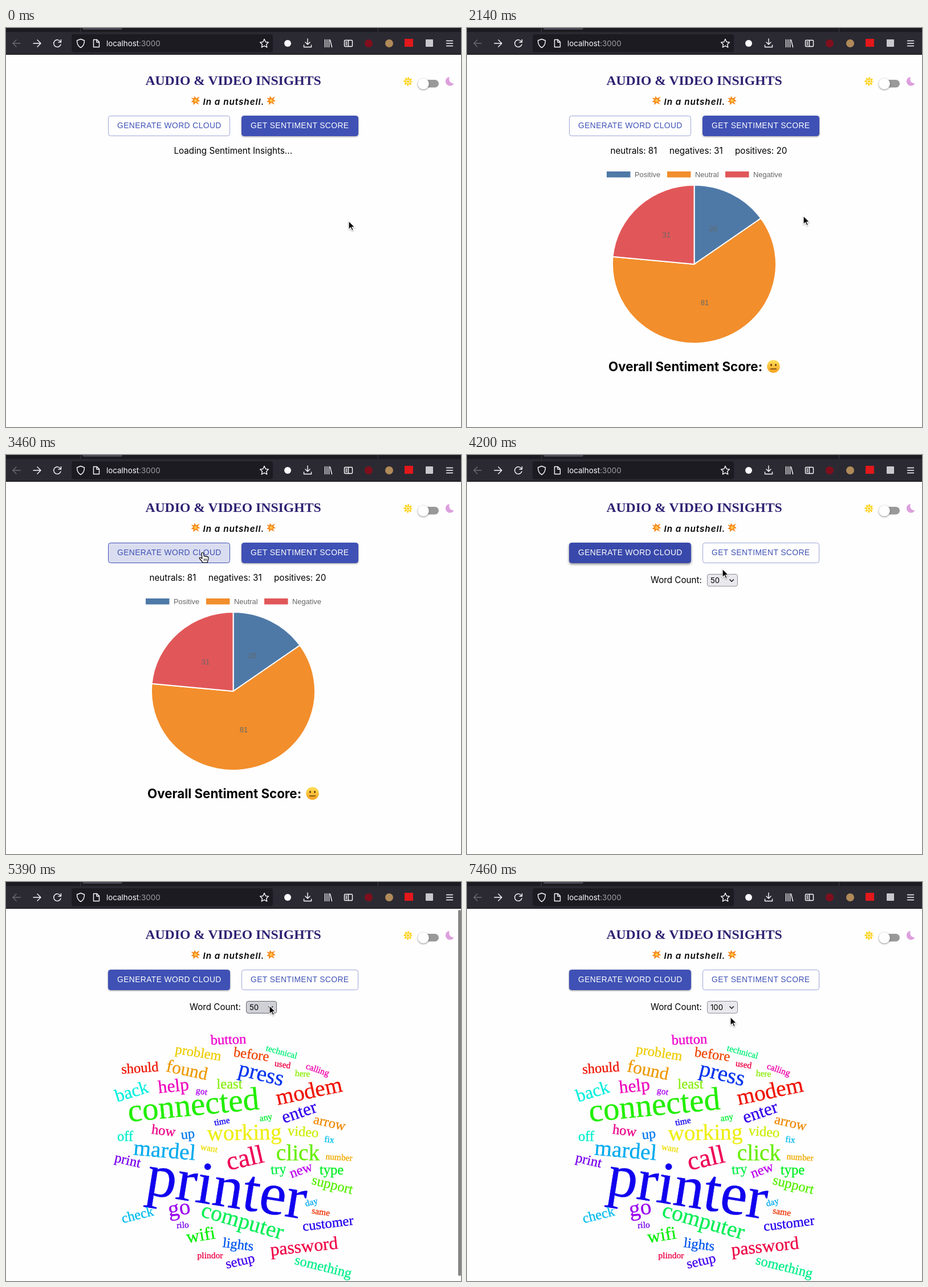
An HTML page that plays this animation: 798x701 px, repeating every 8000 ms.

```html
<!DOCTYPE html>
<html lang="en">
<head>
<meta charset="utf-8">
<title>Audio &amp; Video Insights</title>
<style>
  html, body { margin: 0; width: 100%; height: 100%; overflow: hidden; background: #fefefe; }
  svg { display: block; }
  text { white-space: pre; }
  .ui { font: 15.2px Inter, sans-serif; }
  .icon { fill: none; stroke: #fbfbfe; stroke-width: 1.4; stroke-linecap: round; stroke-linejoin: round; }
  .button text { font: 13.85px "Liberation Sans", Arial, sans-serif; letter-spacing: .4px; fill: #3f51b5; }
  .button rect { fill: transparent; stroke: #3f51b580; }
  .hover rect { fill: #3f51b50a; stroke: #3f51b5; }
  .pressed rect { fill: #3f51b530; stroke: #3f51b5; }
  .contained rect { fill: #3f51b5; stroke: #3f51b5; filter: drop-shadow(0 1.5px 1.5px #0006); }
  .active rect { fill: #303f9f; stroke: #303f9f; filter: drop-shadow(0 3px 2.5px #0007); }
  .leaving rect { fill: #3949ab; stroke: #3949ab; filter: drop-shadow(0 2.5px 2px #0007); }
  .contained text, .active text, .leaving text { fill: #fff; }
  .chart text { font: 12.9px "Liberation Sans", Arial, sans-serif; fill: #666; }
  #cloud text { font-family: "Liberation Serif", Times, serif; text-anchor: middle; stroke-width: .35px; }
  #menu text { font: 500 13px Inter, sans-serif; fill: #fff; }
</style>
</head>
<body>
<svg width="798" height="701" viewBox="0 0 798 701">
  <defs>
    <linearGradient id="face" x2="0" y2="1">
      <stop stop-color="#ffe05c"/><stop offset="1" stop-color="#f5a11f"/>
    </linearGradient>
    <g id="spark">
      <path d="M-8-5L-3-4-2-8 1-4 7-7 4-2 8 1 3 2 6 7 0 4-4 8-4 3-8 2-4-1Z" fill="#f58a1f"/>
      <circle r="2.500" fill="#ffc94a"/>
    </g>
  </defs>
  <rect width="798" height="701" fill="#fefefe"/>

  <g id="toolbar">
    <rect width="798" height="47" fill="#0c0c0f"/>
    <rect width="798" height="7" fill="#1c1b22"/>
    <rect x="134" y="-5" width="70" height="8" rx="3" fill="#4a4953"/>
    <path d="M130.500 0v7M652.500 0v7" stroke="#3c3b45"/>
    <rect y="7" width="798" height="39" fill="#2b2a33"/>
    <rect x="115" y="11" width="353" height="31.500" rx="4" fill="#1c1b22"/>
    <g class="icon">
      <path d="M25 27H12m6-6l-6 6 6 6" stroke="#6d6c75"/>
      <path d="M48 27h13m-6-6l6 6-6 6"/>
      <path d="M95.500 24a6.300 6.300 0 1 0 .5 5M96.500 20.500V25H92"/>
      <path d="M131 19.500l6.500 2.500c0 6-1.500 10-6.500 12.500-5-2.500-6.500-6.500-6.500-12.500z"/>
      <path d="M153.500 20.500h6l4 4v9h-10zM159 21v4h4"/>
      <path d="M453 19.500l2.300 5 5.200.6-3.900 3.600 1.100 5.300-4.700-2.700-4.700 2.700 1.100-5.300-3.900-3.600 5.200-.6z"/>
      <path d="M529 19v10m-4-4l4 4 4-4M522.500 30v3.500h13V30"/>
      <path d="M559.500 20.500v13M563 20.500v13M566.500 20.500v13M568.500 21l3 12.500"/>
      <rect x="593.500" y="21.500" width="14" height="11" rx="1.500"/>
      <path d="M600.500 22v10M596 24.500h2M596 27h2M596 29.500h2"/>
      <path d="M772.500 22.500h11M772.500 27h11M772.500 31.500h11"/>
    </g>
    <circle cx="494" cy="27" r="6" fill="#fbfbfe"/>
    <circle cx="636" cy="27" r="7" fill="#800f1d"/>
    <circle cx="672" cy="27" r="7" fill="#b08a58"/>
    <rect x="699" y="19" width="15" height="14" fill="#e2181b"/>
    <rect x="736" y="20" width="13" height="13" rx="1" fill="#c8c8cd"/>
    <text class="ui" x="176" y="32" fill="#fbfbfe" style="font-size:13.4px">localhost<tspan fill="#9f9ea6">:3000</tspan></text>
  </g>

  <text x="398.500" y="99.500" text-anchor="middle" fill="#2f2172" style="font:bold 23.7px 'Liberation Serif',Times,serif">AUDIO &amp; VIDEO INSIGHTS</text>
  <text x="345.500" y="135" style="font:italic 600 15.2px Inter,sans-serif;letter-spacing:1px">In a nutshell.</text>
  <use href="#spark" x="332.500" y="127.500"/>
  <use href="#spark" x="465" y="127.500"/>

  <g transform="translate(705 94)" fill="none" stroke="#ffd21a">
    <circle r="5.800" stroke-width="3.500" stroke-dasharray="2.600 1.950" stroke-dashoffset="1.300"/>
    <circle r="4.200" stroke-width="1.800"/><circle r="1.800" fill="#ffd21a"/>
  </g>
  <rect x="725" y="91" width="34" height="13.500" rx="6.700" fill="#999"/>
  <circle cx="732" cy="98" r="9.800" fill="#fefefe" style="filter:drop-shadow(0 1px 1.5px #0007)"/>
  <path d="M778 86a7.800 7.800 0 1 0 7.500 11.500A8 8 0 0 1 778 86z" fill="#dda0dd"/>

  <g id="cloudButton" class="button">
    <rect x="179.500" y="154.500" width="213" height="35" rx="4"/>
    <text x="195" y="176">GENERATE WORD CLOUD</text>
  </g>
  <g id="scoreButton" class="button">
    <rect x="413.500" y="154.500" width="204" height="35" rx="4"/>
    <text x="429" y="176">GET SENTIMENT SCORE</text>
  </g>

  <text id="loading" class="ui" x="294.500" y="221">Loading Sentiment Insights...</text>
  <g id="scores" class="ui">
    <text x="251.500" y="221">neutrals: 81</text>
    <text x="355" y="221">negatives: 31</text>
    <text x="470" y="221">positives: 20</text>
    <text x="248" y="603" style="font-weight:700;font-size:22.3px">Overall Sentiment Score:</text>
    <g transform="translate(537.500 594.500)">
      <circle r="11.300" fill="url(#face)"/>
      <ellipse cx="-4" cy="-2.500" rx="1.500" ry="2.100" fill="#6b3c0c"/>
      <ellipse cx="4" cy="-2.500" rx="1.500" ry="2.100" fill="#6b3c0c"/>
      <path d="M-5 4.500H5" stroke="#6b3c0c" stroke-width="1.500" stroke-linecap="round"/>
    </g>
  </g>
  <g id="chart" class="chart"></g>

  <g id="counter" class="ui">
    <text x="322" y="225">Word Count:</text>
    <rect id="select" x="421.500" y="209.500" width="53" height="21" rx="3.500"/>
    <text id="count" x="427" y="225" style="font-size:13.2px"></text>
    <path d="M460.500 218.500l3.700 3.700 3.700-3.700" fill="none" stroke="#111" stroke-width="1.500"/>
  </g>
  <g id="cloud"></g>
  <rect id="scrollbar" x="793" y="49" width="5" height="643" rx="2.500" fill="#858585"/>

  <g id="menu">
    <rect x="415" y="182" width="78" height="118" rx="9" fill="#00000018"/>
    <rect x="420.500" y="188.500" width="67" height="107" rx="4" fill="#656160" stroke="#9a9795" style="filter:drop-shadow(0 4px 6px #0004)"/>
    <rect id="highlight" x="421" width="66" height="20" fill="#70bf57"/>
    <path d="M428 222.500l3 3.500 5-8" fill="none" stroke="#fff" stroke-width="1.500"/>
  </g>

  <g id="cursor">
    <path id="arrow" d="M0 0V15L3.500 11.800 5.800 17 8.300 16 6 10.900H10.700Z" stroke="#fff" stroke-width="1.200" style="filter:drop-shadow(0 1px 1px #0005)"/>
    <g id="hand" fill="#fff" stroke="#000" stroke-width="1.200" stroke-linejoin="round">
      <path d="M-2 1.500Q-2-.5-.3-.5T1.500 1.500L2.300 6Q3.500 4.500 5 6.500 6.500 5 7.600 7 9.500 6 10 8.500 10.500 12 8.500 14.500V17H-.5L-1.500 14.500-5.500 10Q-6.500 7.800-4 8L-1 10Z"/>
      <path d="M2.500 10v4M4.700 10v4M7 10v4" stroke-width=".900"/>
    </g>
  </g>
</svg>
<script>
const LOOP = 8000;
const $ = id => document.getElementById(id);

function add(parent, tag, attributes, text = '') {
  const node = document.createElementNS('http://www.w3.org/2000/svg', tag);
  for (const name in attributes) node.setAttribute(name, attributes[name]);
  node.textContent = text;
  parent.append(node);
}

function buildChart() {
  const cx = 398.5, cy = 415, rx = 143.5, ry = 139;
  const slices = [
    ['Positive', 20, '#4e79a7', 245, 432, 357],
    ['Neutral', 81, '#f28e2c', 351, 417, 487],
    ['Negative', 31, '#e15759', 453, 350, 368],
  ];
  const total = slices.reduce((sum, slice) => sum + slice[1], 0);
  const rim = value => {
    const angle = value / total * 2 * Math.PI;
    return `${cx + rx * Math.sin(angle)} ${cy - ry * Math.cos(angle)}`;
  };
  let start = 0;
  for (const [name, value, fill, legendX, labelX, labelY] of slices) {
    const large = +(value > total / 2);
    add($('chart'), 'rect', { x: legendX, y: 252, width: 41.5, height: 10.5, fill });
    add($('chart'), 'text', { x: legendX + 49, y: 262 }, name);
    add($('chart'), 'path', {
      d: `M${cx} ${cy}L${rim(start)}A${rx} ${ry} 0 ${large} 1 ${rim(start + value)}Z`,
      fill, stroke: '#fff', 'stroke-width': 2,
    });
    add($('chart'), 'text', { x: labelX, y: labelY, 'text-anchor': 'middle' }, value);
    start += value;
  }
}

// Each word: text, colour, centre x, centre y, tilt in degrees.
function addWords(size, words) {
  for (const [word, fill, x, y, tilt = 0] of words) {
    add($('cloud'), 'text', {
      transform: `translate(${x} ${y}) rotate(${tilt})`,
      dy: '.23em', 'font-size': size, fill, stroke: fill,
    }, word);
  }
}

function buildCloud() {
  addWords(106, [['printer', '#10e', 386, 546, 9]]);
  addWords(57, [['connected', '#2e0', 329, 397, -5.5]]);
  addWords(46, [['call', '#e05', 420, 489, -13]]);
  addWords(39.3, [
    ['press', '#03e', 447, 340, 14], ['modem', '#e10', 532, 371, -12],
    ['working', '#ee1', 418, 444, -1], ['mardel', '#0ae', 278, 475, 5],
    ['click', '#6e0', 512, 480], ['go', '#90e', 304, 576, -8],
    ['computer', '#0e5', 414, 599, 16],
  ]);
  addWords(31.5, [
    ['found', '#e90', 317, 333, 12], ['help', '#e0b', 294, 361, -6],
    ['back', '#0ed', 221, 371, -17], ['enter', '#30e', 515, 407, -19],
    ['password', '#e04', 523, 643, -6], ['wifi', '#0e0', 342, 623, -9],
  ]);
  addWords(24.5, [
    ['button', '#e0c', 390, 279, -2], ['problem', '#ec0', 337, 302, 9],
    ['before', '#e40', 430, 305, 8], ['should', '#e10', 235, 329, -4],
    ['least', '#8e1', 392, 357], ['arrow', '#e80', 567, 425, 13],
    ['off', '#0ec', 209, 449], ['how', '#e08', 276, 439, 7],
    ['up', '#07e', 319, 445, -6], ['video', '#ce0', 521, 441, 4],
    ['print', '#70e', 213, 491, 13], ['try', '#0e4', 478, 507, -4],
    ['new', '#b0e', 518, 508, -20], ['type', '#0e2', 571, 508],
    ['support', '#5e0', 572, 534, 14], ['check', '#0be', 231, 587, -14],
    ['customer', '#20e', 565, 602, -7], ['lights', '#05e', 407, 639, 7],
    ['setup', '#40e', 411, 668, -13], ['something', '#0e8', 556, 678, 14],
  ]);
  addWords(15.5, [
    ['technical', '#0e7', 483, 300, 15], ['used', '#e04', 485, 322, 9],
    ['here', '#8e0', 520, 338, 4], ['calling', '#e0a', 546, 331, 19],
    ['got', '#a0e', 343, 369, 10], ['time', '#10e', 379, 422, -10],
    ['any', '#0e3', 456, 415, -10], ['fix', '#0be', 567, 454, 5],
    ['want', '#ed0', 356, 469, 10], ['number', '#ea0', 584, 485, 4],
    ['day', '#0ae', 536, 564, -15], ['same', '#e30', 552, 581, 8],
    ['rilo', '#70e', 310, 604, -3], ['plindor', '#e04', 358, 657],
  ]);
}

// Every step of the screen, with the pointer tip: time, x, y.
const steps = [
  [0, 601, 339], [500, 601, 339], [790, 601, 339],
  [2140, 590, 330], [2290, 538, 288], [2430, 460, 232],
  [2570, 394, 196], [2720, 357, 178], [2860, 345, 172],
  [3460, 345, 172], [3610, 345, 172], [3760, 345, 172], [3900, 352, 174],
  [4050, 388, 184], [4200, 448, 200], [4340, 459, 208], [4490, 462, 212],
  [4640, 462, 215], [4790, 462, 217],
  [5390, 462, 217], [5540, 462, 217], [5680, 462, 217], [5830, 462, 219],
  [5980, 462, 224], [6120, 461, 231], [6270, 461, 235], [6420, 462, 236],
  [6570, 462, 236], [6720, 462, 236], [6870, 462, 236],
  [7320, 462, 236.5], [7460, 462, 237],
];

const show = (id, opacity) => {
  $(id).style.display = opacity ? '' : 'none';
  $(id).style.opacity = +opacity;
};

function cloudButtonState(time) {
  if (time < 2720) return '';
  if (time < 3460) return 'hover';
  if (time < 3610) return 'pressed';
  if (time < 4200) return 'active';
  return time < 4340 ? 'leaving' : 'contained';
}

function render(now) {
  const [time, x, y] = steps.findLast(step => step[0] <= now);
  const during = (from, to = LOOP) => time >= from && time < to;

  show('loading', during(0, 500));
  show('scores', during(500, 3610));
  show('chart', during(790, 3610));
  show('counter', during(3610));
  show('cloud', during(4490));
  show('scrollbar', during(4490, 5540) || during(5540, 5680) * 0.5);
  show('menu', during(5540, 6720) || during(6720, 6870) * 0.5);
  show('highlight', !during(6570, 6720));

  $('cloudButton').setAttribute('class', 'button ' + cloudButtonState(time));
  $('scoreButton').setAttribute('class', 'button ' + (time < 3610 ? 'contained' : ''));
  const hovered = during(4490, 6720);
  $('select').setAttribute('fill', hovered ? '#d0d0d7' : '#e9e9ed');
  $('select').setAttribute('stroke', hovered ? '#67676f' : '#8f8f9d');
  $('count').textContent = time < 6720 ? 50 : 100;
  $('highlight').setAttribute('y', y < 231 ? 212 : 232);

  const hand = during(2720, 4200);
  show('hand', hand);
  show('arrow', !hand);
  $('cursor').setAttribute('transform', `translate(${x} ${y})`);
}

buildChart();
buildCloud();
[10, 50, 100, 200, 500].forEach((count, row) =>
  add($('menu'), 'text', { x: 441.5, y: 207 + row * 19.8 }, count));

function frame() {
  render(performance.now() % LOOP);
  requestAnimationFrame(frame);
}
frame();
</script>
</body>
</html>
```
